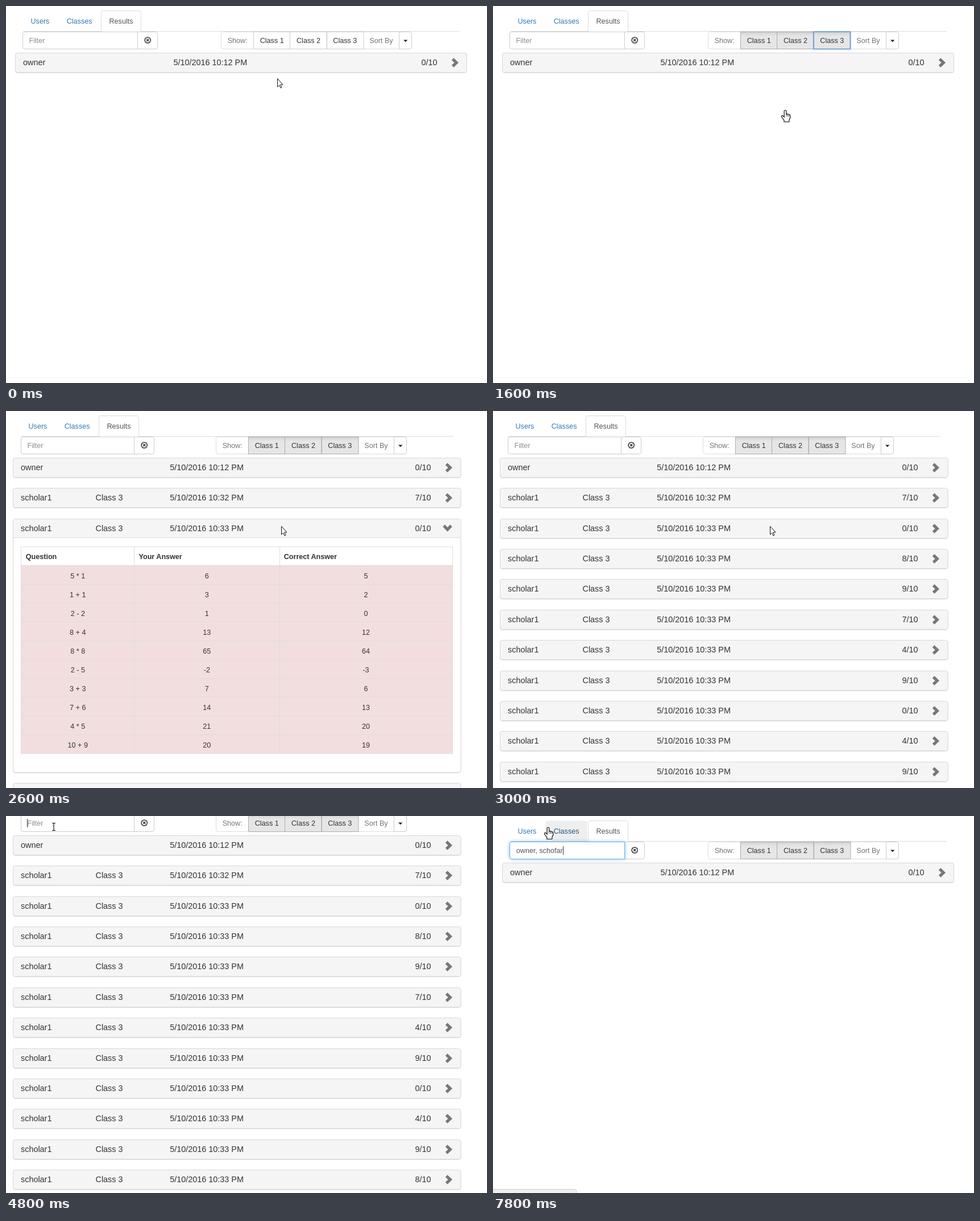
An HTML page that plays this animation: 846 px wide and 662 px high, repeating every 8 s.

```html
<!DOCTYPE html>
<html lang="en">
<head>
<meta charset="utf-8">
<title>Results</title>
<style>
  html, body { margin: 0; width: 100%; height: 100%; overflow: hidden; background: #fff; }
  svg { display: block; }
  text { font-family: "Liberation Sans", Arial, sans-serif; font-size: 12.6px; fill: #333; white-space: pre; }
  .row { font-size: 14.4px; }
  .head { font-weight: bold; }
  .mid { text-anchor: middle; }
  .link { fill: #337ab7; }
  .tab { fill: #555; }
  .glow { filter: drop-shadow(0 0 3px rgba(102, 175, 233, .75)); }
</style>
</head>
<body>
<svg id="stage" width="846" height="662" viewBox="0 0 846 662">
  <defs>
    <linearGradient id="pressed" x1="0" y1="0" x2="0" y2="1">
      <stop offset="0" stop-color="#d0d0d0"/>
      <stop offset=".2" stop-color="#e3e3e3"/>
      <stop offset=".3" stop-color="#e6e6e6"/>
    </linearGradient>
  </defs>
  <g id="scene"></g>
</svg>
<script>
const STEP = 200, LOOP = 8000;
const OWNER = 'owner', PUPIL = 'scholar1';
const scores = [0, 7, 0, 8, 9, 7, 4, 9, 0, 4, 9, 8];
const answers = [['5 * 1', 5], ['1 + 1', 2], ['2 - 2', 0], ['8 + 4', 12], ['8 * 8', 64],
  ['2 - 5', -3], ['3 + 3', 6], ['7 + 6', 13], ['4 * 5', 20], ['10 + 9', 19]];

// Lists of [first step, value]; the latest reached value applies.
const typed = [[0, ''], [28, 'ow'], [29, 'owne'], [30, OWNER], [36, 'owner,'],
  [37, 'owner, s'], [38, 'owner, scho'], [39, 'owner, schofar']];
const caretOn = [[0, 0], [24, 1], [26, 0], [28, 1], [33, 0], [36, 1]];
const glowing = [[0, 0], [25, .5], [26, 1]];
const pointer = [[0, 'arrow'], [2, 'hand'], [13, 'arrow'], [23, 'beam'], [29, 'hand']];
// Keyframes of [step, value...], joined linearly.
const path = [[0, 477, 127], [1, 474, 108], [2, 466, 64], [3, 468, 59], [4, 532, 60],
  [6, 592, 60], [7, 566, 108], [8, 514, 183], [10, 490, 201], [12, 484, 202], [13, 484, 202],
  [15, 487, 202], [18, 341, 354], [23, 84, 19], [24, 84, 19], [25, 97, 20]];
const opening = [[10, 0], [11, .45], [12, 1], [13, 1], [14, .45], [15, 0]];
const scrolling = [[16, 0], [18, 48]];

const at = (list, k) => list.filter(e => e[0] <= k).pop()[1];
function tween(keys, k, i = 1) {
  const n = keys.findIndex(e => e[0] > k);
  if (n < 0) return keys[keys.length - 1][i];
  if (n === 0) return keys[0][i];
  const a = keys[n - 1], b = keys[n];
  return a[i] + (b[i] - a[i]) * (k - a[0]) / (b[0] - a[0]);
}

const text = (x, y, s, cls = '') => `<text x="${x}" y="${y}" class="${cls}">${s}</text>`;
const rect = (x, y, w, h, fill, stroke = 'none', more = '') =>
  `<rect x="${x}" y="${y}" width="${w}" height="${h}" fill="${fill}" stroke="${stroke}" ${more}/>`;
const shape = (d, fill, stroke = 'none', more = '') =>
  `<path d="${d}" fill="${fill}" stroke="${stroke}" ${more}/>`;
// Box with separate left and right corner radii.
function box(x, y, w, h, fill, stroke, l, r) {
  return shape(`M${x + l} ${y}H${x + w - r}q${r} 0 ${r} ${r}V${y + h - r}q0 ${r} ${-r} ${r}` +
    `H${x + l}q${-l} 0 ${-l} ${-l}V${y + l}q0 ${-l} ${l} ${-l}Z`, fill, stroke);
}
const tabShape = (x, w) => `M${x} 44.5V12q0-3.5 3.5-3.5H${x + w - 3.5}q3.5 0 3.5 3.5V44.5`;

const cursors = {
  arrow: shape('M.5.5V15L3.7 12L6 17L8 16L5.8 11H10Z', '#fff', '#111'),
  hand: shape('M-1.8 1.2Q0-1.2 1.8 1.2V7Q3.5 5.5 4.5 7.3Q6 6.3 6.8 8Q8.8 7.6 8.8 9.5V13L6.8 17.5V20.5' +
    'H-2V18L-6.5 11.5Q-6.5 8.5-4 9.8L-1.8 12Z', '#fff', '#111', 'stroke-width="1.2"') +
    shape('M1.8 7V11M4.5 8V11M6.8 8.5V11', 'none', '#111', 'stroke-width=".8"'),
  beam: shape('M-3-6.5H-1Q0-6.5 0-5.5Q0-6.5 1-6.5H3M0-6V6M-3 6.5H-1Q0 6.5 0 5.5Q0 6.5 1 6.5H3', 'none', '#111', 'stroke-width="1.2"')
};

function tabs(wide, hover) {
  const d = wide ? 0 : -4, end = wide ? 798 : 787;
  return shape(`M${30 + d} 44.5H${end}`, 'none', '#ddd') +
    (hover ? shape(tabShape(92.5, 73), '#eee') : '') +
    shape(tabShape(167.5 + d, 70), '#fff', '#ddd') +
    shape(`M${168 + d} 44.5h69`, 'none', '#fff') +
    text(43.5 + d, 31, 'Users', 'link') +
    `<g${hover ? ' style="filter:brightness(.7)"' : ''}>${text(106.7 + d, 31, 'Classes', 'link')}</g>` +
    text(181.5 + d, 31, 'Results', 'tab');
}

function filterBox(wide, value, glow) {
  const x = wide ? 29.5 : 26.5, split = wide ? 231.5 : 225.5, cx = split + 17.7;
  return box(split, 45.5, 35, 30, '#fff', '#ccc', 0, 3.6) +
    box(x, 45.5, split - x, 30, '#fff', '#ccc', 3.6, 0) +
    (glow ? `<g class="glow" opacity="${glow}">${box(x, 45.5, split - x, 30, '#fff', '#66afe9', 3.6, 0)}</g>` : '') +
    `<circle cx="${cx}" cy="60" r="5.1" fill="none" stroke="#333" stroke-width="1.5"/>` +
    shape(`M${cx - 2} 58l4 4m0-4l-4 4`, 'none', '#333', 'stroke-width="1.7"') +
    `<g id="value">${value ? text(x + 11.3, 65, value, 'tab') : ''}</g>` +
    (value ? '' : `<g opacity=".55">${text(x + 11, 65, 'Filter')}</g>`);
}

function toolbar(wide, k) {
  const d = wide ? 0 : -9;
  let out = `<g opacity=".65">` + box(378.5 + d, 45.5, 57, 30, '#fff', '#ccc', 3.6, 0) +
    rect(628.5 + d, 45.5, 63, 30, '#fff', '#ccc') + '</g>' +
    `<g opacity=".68">${text(389.7 + d, 65, 'Show:')}${text(639.3 + d, 65, 'Sort By')}</g>` +
    box(691.5 + d, 45.5, 22, 30, '#fff', '#ccc', 0, 3.6) +
    shape(`M${699 + d} 59.5h7.4l-3.7 3.8Z`, '#222');
  const idle = [], on = [];
  [3, 4, 6].forEach((pressAt, i) => {
    const x = 435.5 + d + 64.3 * i, active = k >= pressAt, hover = k === pressAt - 1;
    const xr = Math.floor(x) + .5;
    (active ? on : idle).push(rect(xr, 45.5, 64.5, 30,
      active ? 'url(#pressed)' : hover ? '#e6e6e6' : '#fff', active || hover ? '#adadad' : '#ccc') +
      text(x + 11.2, 65, 'Class ' + (i + 1)));
  });
  out += idle.join('') + on.join('');
  if (k >= 6 && k <= 10) out += rect(563.8 + d, 45.2, 64.6, 30.4, 'none', '#6c9fda', 'stroke-width="1.8"');
  return out;
}

function chevron(x, y, down) {
  return `<g transform="translate(${x} ${y}) rotate(${down ? 90 : 0})">` +
    shape('M6.3 0L-2.3-8.2L-5.9-4.6L-1.1 0L-5.9 4.6L-2.3 8.2Z', '#777') + '</g>';
}

function answerTable(y) {
  let out = rect(26.5, y + 15.5, 759, 363, '#fff', '#ddd') + rect(27, y + 49, 758, 329.5, '#f2dede');
  ['Question', 'Your Answer', 'Correct Answer'].forEach((s, i) =>
    out += text([34.7, 233.5, 488.7][i], y + 37, s, 'head'));
  answers.forEach(([q, right], i) => {
    const ly = y + 48.5 + 33 * i;
    out += shape(`M26.5 ${ly}H785.5`, 'none', '#ddd', i ? '' : 'stroke-width="1.6"');
    [q, right + 1, right].forEach((s, c) => out += text([126.3, 353.3, 633][c], ly + 22.6, s, 'mid'));
  });
  return out + shape(`M225.5 ${y + 15.5}v363M481.5 ${y + 15.5}v363`, 'none', '#ddd');
}

function panel(i, y, wide, open) {
  const x = wide ? 16.5 : 12.5, w = wide ? 794 : 787.5, grow = Math.round(411 * open);
  const right = wide ? 0 : -11, h = 34 + grow, base = y + 22;
  let out = rect(x, y + 1.5, w, h, 'none', '#e2e2e2', 'rx="3.6"') +
    rect(x, y + .5, w, h, open ? '#fff' : '#f5f5f5', '#d8d8d8', 'rx="3.6"');
  if (open) {
    out += rect(x + .5, y + 1, w - 1, 33, '#f5f5f5', 'none', 'rx="3"') +
      shape(`M${x} ${y + 33.5}h${w}`, 'none', '#ddd') +
      `<svg x="0" y="${y + 34}" width="846" height="${grow}">${answerTable(0)}</svg>`;
  }
  const minute = i === 0 ? 12 : i === 1 ? 32 : 33;
  return out + text(x + 13.5, base, i ? PUPIL : OWNER, 'row') +
    (i ? text(157.5, base, 'Class 3', 'row') : '') +
    text(wide ? 294.6 : 288.3, base, `5/10/2016 10:${minute} PM`, 'row') +
    text(730.6 + right, base, scores[i] + '/10', 'row') +
    chevron(open ? 776.5 : 789.7 + right, y + (open ? 16.5 : 17.5), open > 0);
}

const scene = document.getElementById('scene');

function draw(k) {
  const wide = k < 9 || k >= 28;
  const open = tween(opening, k), scroll = wide ? 0 : tween(scrolling, k);
  const value = at(typed, k);
  let page = tabs(wide, k >= 29) + filterBox(wide, value, at(glowing, k)) + toolbar(wide, k);
  for (let i = 0; i < (wide ? 1 : scores.length); i++) {
    const y = Math.round(82 + 53.36 * i) + (i > 2 ? Math.round(411 * open) : 0);
    page += panel(i, y, wide, i === 2 ? open : 0);
  }
  scene.innerHTML = `<g id="page" transform="translate(0 ${-scroll})">${page}</g>` +
    (k >= 31 ? box(-4.5, 655.5, 151, 12, '#f0f0f0', '#ccc', 0, 3) : '') +
    `<g transform="translate(${tween(path, k, 1)} ${tween(path, k, 2)})">${cursors[at(pointer, k)]}</g>`;
  if (at(caretOn, k)) {
    const label = scene.querySelector('#value text');
    const x = label ? Math.floor(40.8 + label.getComputedTextLength() + .7) : 37;
    scene.querySelector('#page').insertAdjacentHTML('beforeend', rect(x, 53, 1, 15, '#333'));
  }
}

let shown = -1;
const start = performance.now();
function tick() {
  const k = Math.floor((performance.now() - start) % LOOP / STEP);
  if (k !== shown) draw(shown = k);
  requestAnimationFrame(tick);
}
tick();
</script>
</body>
</html>
```
